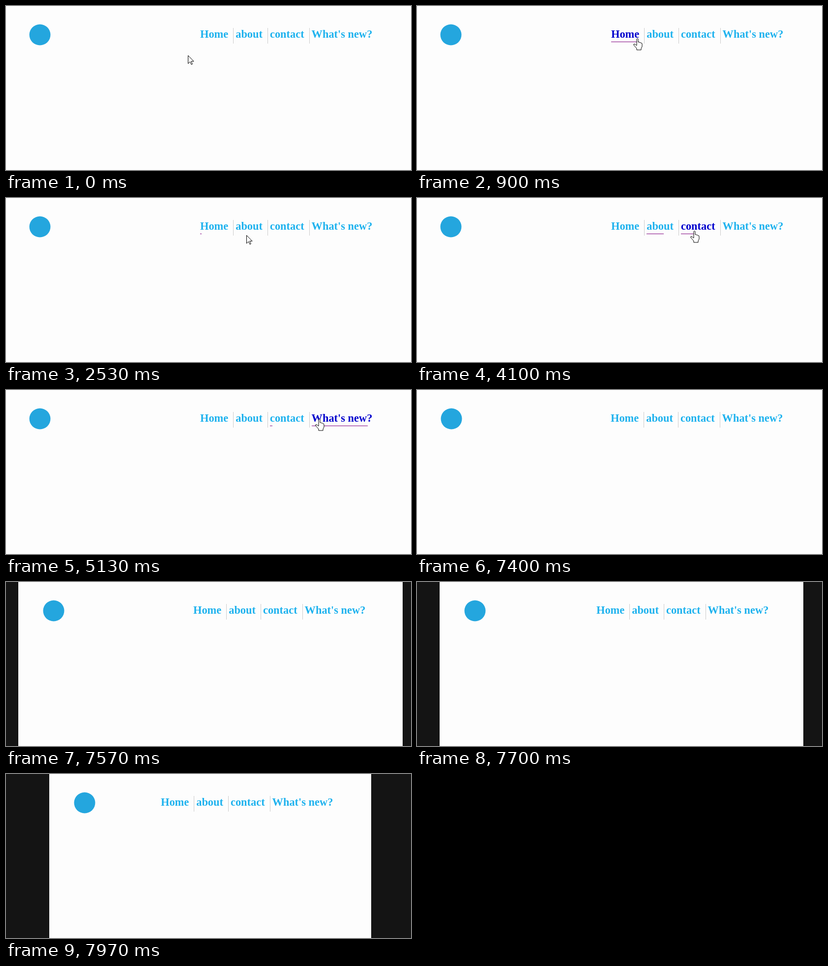
These frames come from a looping animation (824 px wide and 336 px high, 8 s). An HTML page with a canvas:

```html
<!DOCTYPE html>
<html lang="en">
<head>
<meta charset="utf-8">
<title>Navigation hover</title>
<style>
  html, body { margin: 0; width: 100%; height: 100%; overflow: hidden; background: #fdfdfd; }
  canvas { display: block; }
</style>
</head>
<body>
<canvas id="stage" width="824" height="336"></canvas>
<script>
const W = 824, H = 336, LOOP = 8000, FADE = 500, GAP = 15;
const ctx = document.getElementById('stage').getContext('2d');
ctx.font = 'bold 22.4px "Liberation Serif", serif';

// enter and leave are the hover times
const links = [
  { text: 'Home', enter: 400, leave: 2165 },
  { text: 'about', enter: 2670, leave: 3985 },
  { text: 'contact', enter: 3985, leave: 4800 },
  { text: "What's new?", enter: 4800, leave: 5462 },
];
let menuWidth = 0;
for (const link of links) {
  link.x = menuWidth;
  link.width = ctx.measureText(link.text).width;
  menuWidth += link.width + GAP;
}

// each move runs along a quadratic curve that starts where the last one ended
const pointerStart = [370, 101];
const moves = [
  { start: 30, end: 830, via: [408, 72], to: [447, 66] },
  { start: 1900, end: 2700, via: [466, 101], to: [505, 64] },
  { start: 3870, end: 4670, via: [627, 70], to: [600, 66] },
  { start: 4670, end: 5430, via: [641, 57], to: [645, 60] },
  { start: 5430, end: 5567, via: [652, 199], to: [660, 338] },
];

const arrow = new Path2D('M.5 .5V17L4.4 13.3L7.2 19L9.3 18L6.8 12.3H12Z');
const hand = new Path2D('M0 1.5Q1.5 -.5 3 1.5V8Q5 7 6 9Q8 8 9 10Q11 9.5 11 12V17L9 21V24H0V21' +
  'L-6 14Q-7 11 -4 12L0 15Z');

function pointerAt(t) {
  let from = pointerStart;
  for (const { start, end, via, to } of moves) {
    if (t < start) break;
    const p = Math.min(1, (t - start) / (end - start)), q = 1 - p;
    from = from.map((v, i) => q * q * v + 2 * p * q * via[i] + p * p * to[i]);
  }
  return from;
}

// CSS "ease": cubic-bezier(.25, .1, .25, 1)
function ease(p) {
  if (p <= 0) return 0;
  if (p >= 1) return 1;
  const bezier = (s, c1, c2) => 3 * s * (1 - s) ** 2 * c1 + 3 * s * s * (1 - s) * c2 + s ** 3;
  let low = 0, high = 1;
  for (let i = 0; i < 20; i++) {
    const mid = (low + high) / 2;
    if (bezier(mid, .25, .25) < p) low = mid; else high = mid;
  }
  return bezier(low, .1, 1);
}

function rect(color, x, y, w, h) {
  ctx.fillStyle = color;
  ctx.fillRect(x, y, w, h);
}

const isHovered = (link, t) => t >= link.enter && t < link.leave;

function drawMenu(left, t) {
  links.forEach((link, i) => {
    const x = left + link.x;
    if (i) rect('#ccc', Math.round(x - 5), 45, 1, 32);
    ctx.fillStyle = isHovered(link, t) ? '#0000cd' : '#1eb2ee';
    ctx.fillText(link.text, x, 65);
    const shown = ease((t - link.enter) / FADE) - ease((t - link.leave) / FADE);
    rect('#800080', Math.round(x), 73, Math.round(link.width * shown), 1);
  });
}

function drawPointer(t) {
  const [x, y] = pointerAt(t);
  const shape = links.some(link => isHovered(link, t)) ? hand : arrow;
  ctx.save();
  ctx.translate(Math.round(x), Math.round(y));
  ctx.fillStyle = '#fff';
  ctx.strokeStyle = '#000';
  ctx.fill(shape);
  ctx.stroke(shape);
  ctx.restore();
}

function draw(t) {
  // the window is squeezed from both sides; the menu follows at a growing pace
  const squeeze = Math.max(0, t - 7393) * .158;
  const left = Math.round(squeeze - 3);
  const right = Math.round(836 - squeeze * 1.02);
  const menuLeft = Math.floor(395 - squeeze * .28 - squeeze ** 2 * .0065);

  rect('#141414', 0, 0, W, H);
  rect('#fdfdfd', left, 0, right - left, H);
  ctx.fillStyle = '#24a6de';
  ctx.beginPath();
  ctx.arc(left + 72, 59, 21.5, 0, 2 * Math.PI);
  ctx.fill();
  drawMenu(menuLeft, t);
  drawPointer(t);
}

const start = performance.now();
function tick() {
  draw((performance.now() - start) % LOOP);
  requestAnimationFrame(tick);
}
tick();
</script>
</body>
</html>
```
